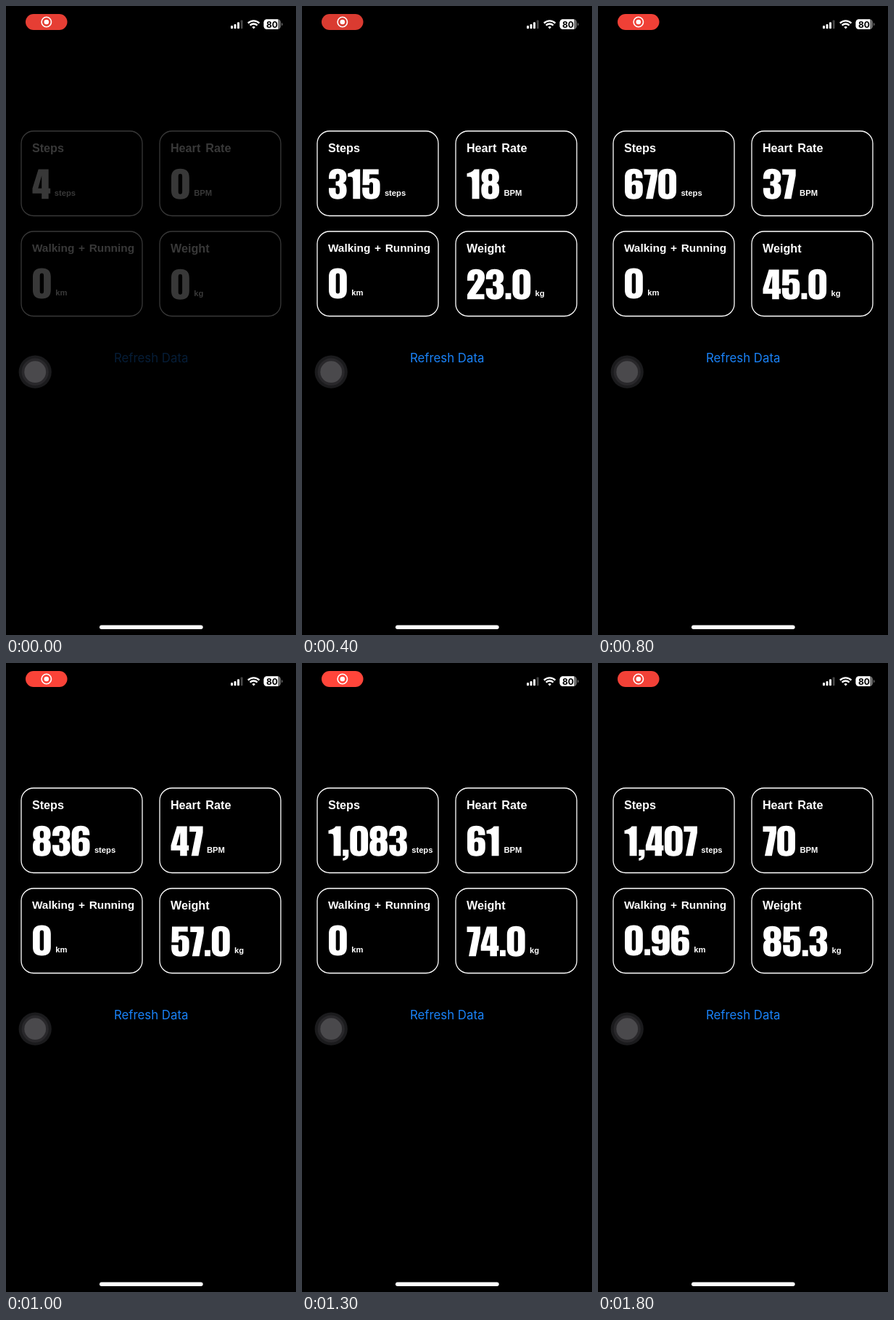
Recreate the animation shown at these times as an HTML page. Size 400 px wide and 865 px high, loop 1900 ms.

```html
<!DOCTYPE html>
<html lang="en">
<head>
<meta charset="utf-8">
<title>Health data</title>
<style>
  html, body { margin: 0; height: 100%; overflow: hidden; background: #000; }
  svg { display: block; }
  #cards text { font: bold 11.2px "Liberation Sans", Arial, sans-serif; fill: #fff; }
  #cards .title { font-size: 16.2px; word-spacing: 2.6px; }
  #cards .title.long { font-size: 15.4px; word-spacing: 1.4px; }
  #cards path { fill: #fff; fill-rule: evenodd; }
  #cards rect { fill: none; stroke: #fff; stroke-width: 1.3; }
  #refresh { font: 16.8px Inter, sans-serif; fill: #1a82f7; text-anchor: middle; }
  #charge { font: bold 12px Inter, sans-serif; text-anchor: middle; }
</style>
</head>
<body>
<svg width="400" height="865" viewBox="0 0 400 865">
  <rect id="pill" x="27" y="11" width="57.5" height="22" rx="11" fill="#ff453a"/>
  <circle cx="55.8" cy="22" r="6.7" fill="none" stroke="#fff" stroke-width="1.6"/>
  <circle cx="55.8" cy="22" r="3.3" fill="#fff"/>

  <g fill="#fff">
    <rect x="310" y="27" width="3" height="4.2" rx="1"/>
    <rect x="314.5" y="25" width="3" height="6.2" rx="1"/>
    <rect x="319" y="22.2" width="3" height="9" rx="1"/>
    <rect x="323.6" y="19.4" width="3" height="11.8" rx="1" fill="#444"/>
  </g>
  <g fill="none" stroke="#fff" stroke-width="2.3">
    <path d="M333.8 23.6a11 11 0 0 1 15.6 0M336.6 26.6a7 7 0 0 1 10 0"/>
    <path d="M341.6 31.4l-2.3-2.3a3.2 3.2 0 0 1 4.6 0z" fill="#fff" stroke="none"/>
  </g>
  <rect x="355.5" y="18.3" width="23.5" height="13.6" rx="4.3" fill="#6b6b6b"/>
  <path d="M359.8 18.3H375.2V31.9H359.8a4.3 4.3 0 0 1-4.3-4.3V22.6a4.3 4.3 0 0 1 4.3-4.3z" fill="#fff"/>
  <path d="M380 23v4.4q1.5-.6 1.5-2.2t-1.5-2.2z" fill="#6b6b6b"/>
  <text id="charge" x="367" y="29.5">80</text>

  <g id="content">
    <g id="cards"></g>
    <text id="refresh" x="200.2" y="490.3">Refresh Data</text>
  </g>

  <circle cx="40.2" cy="503.2" r="22.6" fill="#1b1b1d"/>
  <circle cx="40.2" cy="503.2" r="18.6" fill="#29282b"/>
  <circle cx="40.2" cy="503.2" r="14.9" fill="#4a494c"/>
  <rect x="129" y="851.5" width="142.6" height="5.4" rx="2.7" fill="#fff"/>
</svg>
<script>
const LOOP = 1900, TICK = 100;

// Condensed heavy numerals: [advance, outline]
const glyphs = {
  0: [27, 'M1 12C1 4 5 0 13.4 0S25.8 4 25.8 12V30C25.8 38 22 42 13.4 42S1 38 1 30ZM10.7 10.5V31.5C10.7 34 11.4 35 13.4 35S16.1 34 16.1 31.5V10.5C16.1 8 15.4 7 13.4 7S10.7 8 10.7 10.5Z'],
  1: [19.3, 'M17.5 .7V41.4H7.6V17.5C7.6 13 7 12 6.4 11.6S4 11 .5 11V6.4C6 5 9 3.5 10.5 .7Z'],
  2: [25.7, 'M1 16V12C1 4 5 0 13 0S25 4 25 11.5C25 17 22 22 12.5 34.5H24.5V41.4H1V35C12 18 15.5 15 15.5 10.5C15.5 8 14.8 7 13.2 7S10.5 8 10.5 11V16Z'],
  3: [26.7, 'M1 14V12C1 4 5 0 13 0S25.4 4 25.4 11C25.4 16 24 18.5 20.5 19.8C24 21 25.6 23.5 25.6 30C25.6 38 21 42 13.3 42S1 38 1 29.5V26.5H10.5V30.5C10.5 34 11.2 35 13.2 35S16 34 16 29C16 24.5 15 23.2 10.5 23V17.5C15 17.5 15.8 16 15.8 11.5C15.8 8 15 7 13.3 7S10.6 8 10.6 11V14Z'],
  4: [25.6, 'M22.7 .7V27H25.2V34H22.7V41.4H13.2V34H.5V27L8.7 .7ZM13.2 27V9.5L8.3 27Z'],
  5: [26.7, 'M2 .7H23.7V7.6H11V14.5C12.3 13.3 14 12.7 16 12.7C22 12.7 25.6 15.5 25.6 22V29C25.6 38 22 42 13.3 42S1.2 38 1.2 30V26H10.7V29.5C10.7 34 11.3 35 13.4 35S16 34 16 31V22C16 19.3 15 18.5 13.4 18.5S10.9 19.5 10.9 22.5H1.5Z'],
  6: [27, 'M25.6 13H16.2C16.2 8 15.7 7 13.6 7S10.7 8 10.7 11V18.5C12 16.8 14 16 16.5 16C22.5 16 25.8 19 25.8 25V30C25.8 38 22 42 13.4 42S1 38 1 30V12C1 4 5 0 13.4 0S25.6 4 25.6 11.5ZM10.7 26V31.5C10.7 34 11.5 35 13.3 35S16.2 34 16.2 31.5V26C16.2 23 15.5 22 13.4 22S10.7 23 10.7 26Z'],
  7: [19.2, 'M.5 .7H19V9.5L12.8 41.4H3L9.7 8.2H.5Z'],
  8: [27, 'M1.2 11.5C1.2 4 5 0 13.4 0S25.6 4 25.6 11.5C25.6 16 24.5 18.3 22 19.5C25 21 25.8 23.5 25.8 29.5C25.8 38 22 42 13.4 42S1 38 1 29.5C1 23.5 2 21 5 19.5C2.3 18.3 1.2 16 1.2 11.5ZM10.8 10.5V13.5C10.8 16 11.5 17 13.4 17S16 16 16 13.5V10.5C16 8 15.3 7 13.4 7S10.8 8 10.8 10.5ZM10.7 26.5V31.5C10.7 34 11.4 35 13.4 35S16.1 34 16.1 31.5V26.5C16.1 24 15.4 23 13.4 23S10.7 24 10.7 26.5Z'],
  9: [27, 'M1.2 29H10.6C10.6 34 11.1 35 13.2 35S16.1 34 16.1 31V23.5C14.8 25.2 12.8 26 10.3 26C4.3 26 1 23 1 17V12C1 4 4.8 0 13.4 0S25.8 4 25.8 12V30C25.8 38 21.8 42 13.4 42S1.2 38 1.2 30.5ZM16.1 16V10.5C16.1 8 15.3 7 13.5 7S10.6 8 10.6 10.5V16C10.6 19 11.3 20 13.4 20S16.1 19 16.1 16Z'],
  '.': [10, 'M1.2 33H9V41.4H1.2Z'],
  ',': [10, 'M1 33H9V40C9 45 6.5 47.5 1 48V44.5C3.5 44 4.5 43 4.5 41.4H1Z'],
};

// Linear interpolation through [time, value] points
function track(points, t) {
  const i = points.findIndex(p => p[0] > t);
  if (i < 0) return points.at(-1)[1];
  const [t0, a] = points[i - 1], [t1, b] = points[i];
  return a + (b - a) * (t - t0) / (t1 - t0);
}

const stepPoints = [[0, 4], [200, 193], [400, 315], [800, 670], [1100, 919], [1300, 1083], [1700, 1407]];
const pulse = [[0, .9], [200, .855], [400, .855], [800, .94], [1100, 1], [1300, 1], [1800, .95]];
const fade = [[0, .22], [100, .72], [200, .96], [300, 1]];

function weight(t) {
  const kg = Math.floor((t + 8) * 85.3 / 1500);
  return kg ? Math.min(kg, 85.3).toFixed(1) : '0';
}

const cards = [
  { x: 21, y: 172, title: 'Steps', unit: 'steps', value: t => Math.round(track(stepPoints, t)).toLocaleString('en-US') },
  { x: 212, y: 172, title: 'Heart Rate', unit: 'BPM', value: t => Math.min(70, Math.floor((t + 5) * .0468)) },
  { x: 21, y: 310, title: 'Walking + Running', unit: 'km', shift: -1.3, long: 'long', value: t => t < 1600 ? 0 : 0.96 },
  { x: 212, y: 310, title: 'Weight', unit: 'kg', value: weight },
];

function drawCard({ x, y, title, unit, value, shift = 0, long = '' }, t) {
  const number = String(value(t));
  let pen = 0, digits = '';
  for (const char of number) {
    const [advance, d] = glyphs[char];
    digits += `<path transform="translate(${pen})" d="${d}"/>`;
    pen += advance;
  }
  return `<g transform="translate(${x} ${y})">
    <rect width="167" height="116.5" rx="17"/>
    <g transform="translate(0 ${shift})">
      <text class="title ${long}" x="14.9" y="29.2">${title}</text>
      <g role="img" aria-label="${number}" transform="translate(15 51.8)">${digits}</g>
      <text x="${15 + pen + 5.2}" y="89">${unit}</text>
    </g></g>`;
}

const byId = id => document.getElementById(id);
let shown = -1;

function frame() {
  const t = Math.floor(performance.now() % LOOP / TICK) * TICK;
  if (t !== shown) {
    shown = t;
    byId('cards').innerHTML = cards.map(card => drawCard(card, t)).join('');
    byId('content').setAttribute('opacity', track(fade, t));
    byId('pill').setAttribute('opacity', track(pulse, t));
  }
  requestAnimationFrame(frame);
}
frame();
</script>
</body>
</html>
```
